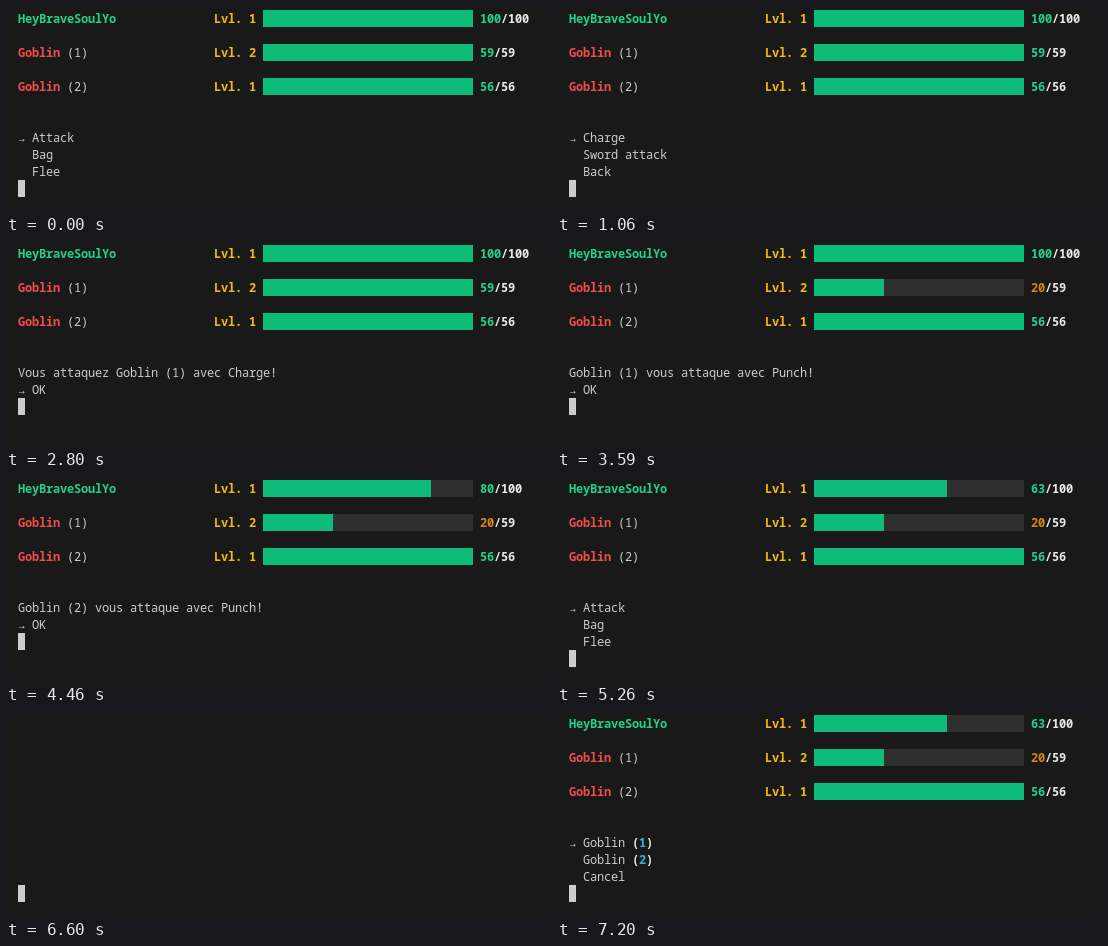
These frames come from a looping animation (545x207 px, 8 s). An HTML page:

```html
<!DOCTYPE html>
<html lang="en">
<head>
<meta charset="utf-8">
<title>Terminal battle</title>
<style>
  html, body { margin: 0; width: 100%; height: 100%; overflow: hidden; background: #191919; }
  #term {
    position: relative; width: 545px; height: 207px; overflow: hidden;
    background: #191919; color: #ccc;
    font: 12px/17px "Noto Sans Mono", "DejaVu Sans Mono", monospace;
    letter-spacing: -.2px; font-variant-ligatures: none;
  }
  #term * { position: absolute; white-space: pre; height: 17px; }
  b { font-weight: 700; }
  .green { color: #23d18b; }
  .red { color: #f14c4c; }
  .gold { color: #f2b90f; }
  .orange { color: #d7871a; }
  .white { color: #e8e8e8; }
  .blue { color: #29b8db; }
  .track { background: #2f2f2f; }
  .fill { background: #0dbc79; }
  .cursor { background: #ccc; }
</style>
</head>
<body>
<div id="term"></div>
<script>
const LOOP = 8000, CELL = 7, ROW = 17, LEFT = 12, TOP = 4, BAR = 30;
const term = document.getElementById('term');

const place = (col, row) => `left:${LEFT + col * CELL}px;top:${TOP + row * ROW}px`;
const text = (col, row, str, color = '') => color
  ? `<b class="${color}" style="${place(col, row)}">${str}</b>`
  : `<span style="${place(col, row)}">${str}</span>`;
const block = (col, row, cells, kind) =>
  `<i class="${kind}" style="${place(col, row)};width:${cells * CELL}px"></i>`;

function fighter(row, name, color, tag, level, hp, max) {
  const tone = hp / max > 0.5 ? 'green' : 'orange';
  const now = String(hp);
  return text(0, row, name, color) + text(name.length + 1, row, tag) +
    text(28, row, 'Lvl. ' + level, 'gold') +
    block(35, row, BAR, 'track') +
    block(35, row, Math.round(hp / max * BAR), 'fill') +
    text(66, row, now, tone) +
    text(66 + now.length, row, '/' + max, 'white');
}

const header = (hero, goblin) =>
  fighter(0, 'HeyBraveSoulYo', 'green', '', 1, hero, 100) +
  fighter(2, 'Goblin', 'red', '(1)', 2, goblin, 59) +
  fighter(4, 'Goblin', 'red', '(2)', 1, 56, 56);

const cursor = row => block(0, row, 1, 'cursor');

// Menu entries may end in a highlighted number: "Goblin (1)"
function entry(row, label) {
  const m = label.match(/^(.+ )\((\d)\)$/);
  if (!m) return text(2, row, label);
  const end = 2 + m[1].length;
  return text(2, row, m[1]) + text(end, row, '(', 'white') +
    text(end + 1, row, m[2], 'blue') + text(end + 2, row, ')', 'white');
}

const menu = (labels, picked = 0, cursorRow = 10) =>
  labels.map((label, i) => entry(7 + i, label)).join('') +
  text(0, 7 + picked, '→') + cursor(cursorRow);

const message = str => text(0, 7, str) + text(0, 8, '→ OK') + cursor(9);

const MAIN = ['Attack', 'Bag', 'Flee'];
const MOVES = ['Charge', 'Sword attack', 'Back'];
const TARGETS = ['Goblin (1)', 'Goblin (2)', 'Cancel'];

const fresh = header(100, 59), hurt = header(63, 20);
const steps = [
  [0, fresh + menu(MAIN)],
  [1060, fresh + menu(MOVES)],
  [2130, fresh + menu(TARGETS)],
  [2800, fresh + message('Vous attaquez Goblin (1) avec Charge!')],
  [3590, header(100, 20) + message('Goblin (1) vous attaque avec Punch!')],
  [4460, header(80, 20) + message('Goblin (2) vous attaque avec Punch!')],
  [5190, hurt + cursor(10)],
  [5260, hurt + menu(MAIN)],
  [5930, hurt + menu(MAIN, 0, 11)],
  [6000, hurt + menu(MOVES)],
  [6600, cursor(10)],
  [6670, hurt + menu(MOVES, 1)],
  [7200, hurt + menu(TARGETS)]
];

let shown;
function draw() {
  const t = performance.now() % LOOP;
  const step = steps.findLast(([start]) => start <= t);
  if (step !== shown) {
    shown = step;
    term.innerHTML = step[1];
  }
  requestAnimationFrame(draw);
}
draw();
</script>
</body>
</html>
```
